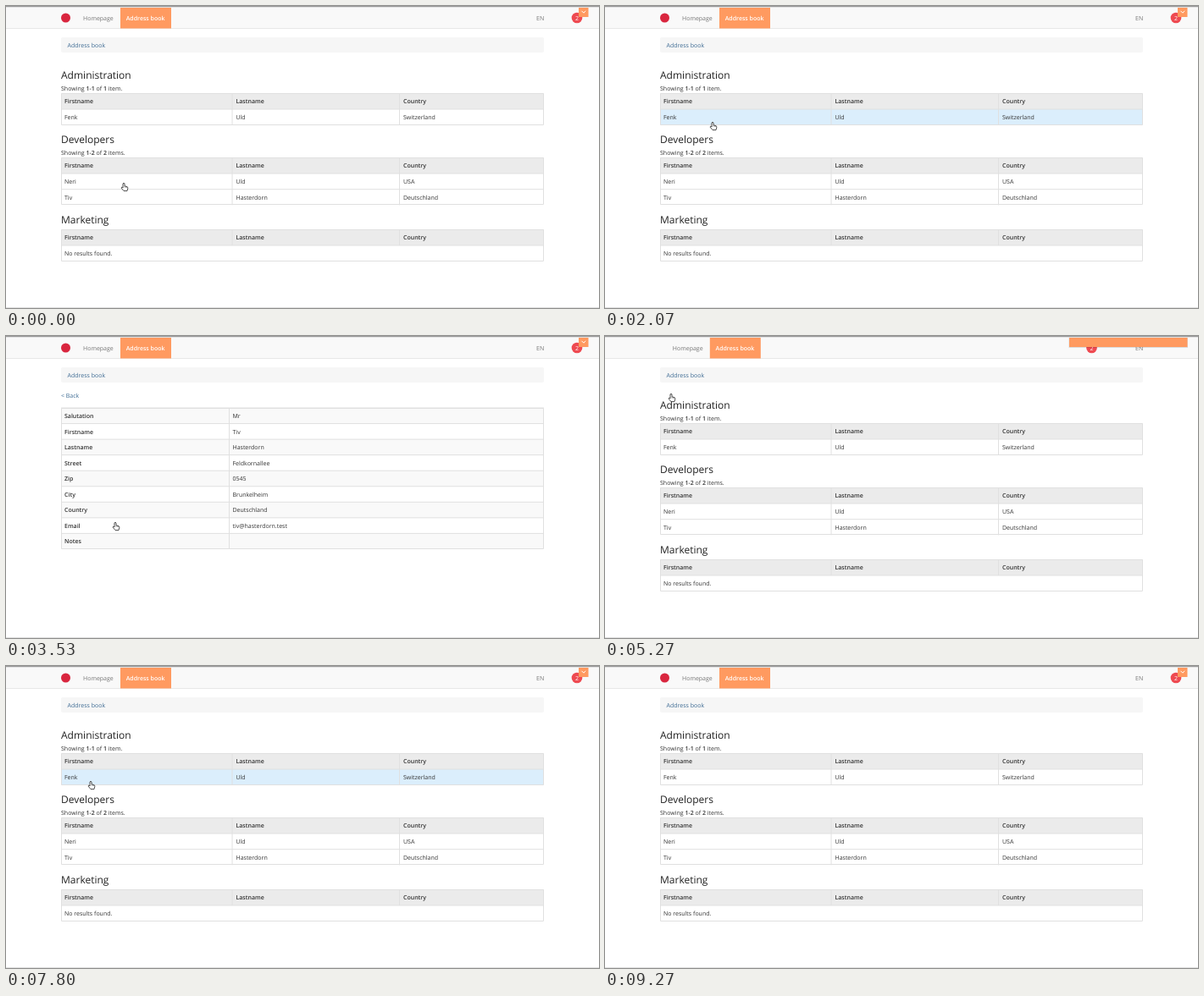
Write an HTML page that moves like this. It is 700x357 px and loops after 9340 ms.

```html
<!DOCTYPE html>
<html lang="en">
<head>
<meta charset="utf-8">
<title>Address book</title>
<style>
  html, body { margin: 0; width: 100%; height: 100%; overflow: hidden; background: #fff; }
  svg { display: block; width: 700px; height: 357px; }
  text { font: 7px "Open Sans", "Noto Sans", sans-serif; fill: #333; white-space: pre; text-rendering: geometricPrecision; }
  .bold { font-weight: 600; }
  .title { font-size: 12px; fill: #222; }
  .link { fill: #3f6c94; }
  .menu { fill: #777; }
  .white { fill: #fff; }
  .line { fill: none; stroke: #e0e0e0; }
  .hover { fill: #dbeefc; }
  .orange { fill: #ff9a60; }
</style>
</head>
<body>
<svg id="stage" viewBox="0 0 700 357"></svg>
<script>
const LOOP = 9340;
const LEFT = 65, RIGHT = 635, WIDTH = RIGHT - LEFT;
const COLS = [69, 271.5, 469];

const people = {
  fenk: ['Mr', 'Fenk', 'Uld', 'Talbogenweg', '0312', 'Ostervalden', 'Switzerland', 'fenk@uldkorn.test', ''],
  neri: ['Mrs', 'Neri', 'Uld', 'Corvel Lane', '0781', 'Pellbrook', 'USA', 'neri@uldkorn.test', ''],
  tiv: ['Mr', 'Tiv', 'Hasterdorn', 'Feldkornallee', '0545', 'Brunkelheim', 'Deutschland', 'tiv@hasterdorn.test', '']
};
const fields = ['Salutation', 'Firstname', 'Lastname', 'Street', 'Zip', 'City', 'Country', 'Email', 'Notes'];

const text = (x, y, str, cls = '') => `<text x="${x}" y="${y}" class="${cls}">${str}</text>`;
const rect = (x, y, w, h, attrs) => `<rect x="${x}" y="${y}" width="${w}" height="${h}" ${attrs}/>`;
const line = d => `<path class="line" d="${d}"/>`;
const cells = (y, row, cls) => row.map((str, i) => text(COLS[i], y, str, cls)).join('');
const group = (id, body) => `<g id="${id}">${body}</g>`;

function table(top, keys) {
  const bottom = top + 19 + 18.7 * (keys.length || 1);
  const colEnd = keys.length ? bottom : top + 19;
  let out = rect(LEFT, top, WIDTH, 19, 'fill="#ebebeb"') +
    cells(top + 12, ['Firstname', 'Lastname', 'Country'], 'bold');
  let lines = `M65.5 ${top + .5}H634.5V${Math.round(bottom) - .5}H65.5Z M65 ${top + 19}H635` +
    `M267 ${top}V${colEnd}M464.5 ${top}V${colEnd}`;
  keys.forEach((key, i) => {
    const y = top + 19 + 18.7 * i, p = people[key];
    out += rect(LEFT, y, WIDTH, 18.7, `class="hover" id="row-${key}"`) +
      cells(y + 12, [p[1], p[2], p[6]]);
    if (i) lines += `M65 ${y}H635`;
  });
  if (!keys.length) out += text(69, top + 30.7, 'No results found.');
  return out + line(lines);
}

function section(y, title, keys) {
  const n = keys.length;
  const summary = n ? text(LEFT, y + 14.4,
    `Showing <tspan class="bold">1-${n}</tspan> of <tspan class="bold">${n}</tspan> item${n > 1 ? 's' : ''}.`) : '';
  return text(LEFT, y, title, 'title') + summary + table(y + (n ? 17 : 7.5), keys);
}

function detail(key) {
  const top = 85, h = 18.55;
  let out = text(LEFT, 72.5, '&lt; Back', 'link'), lines = '';
  fields.forEach((name, i) => {
    const y = top + h * i;
    if (i % 2 === 0) out += rect(LEFT, y, WIDTH, h, 'fill="#f9f9f9"');
    out += text(69, y + 12, name, 'bold') + text(267.5, y + 12, people[key][i]);
    lines += `M65 ${y}H635`;
  });
  return group('detail-' + key, out + line(`M65.5 85.5H634.5V251.5H65.5Z M263.5 85V252${lines}`));
}

const menu = x => text(x, 16.5, 'Homepage', 'menu') +
  rect(x + 44, 1.5, 60, 25, 'class="orange"') +
  text(x + 50.7, 16.5, 'Address book', 'white bold') + text(626, 16.5, 'EN', 'menu');
const badge = x => `<circle cx="${x}" cy="14" r="6.3" fill="#ee4a51"/>` + text(x - 2, 16.6, '2', 'white');

document.getElementById('stage').innerHTML =
  rect(0, 0, 700, 26.5, 'fill="#f9f9f9"') +
  rect(0, 26, 700, 1, 'fill="#e7e7e7"') +
  group('nav', '<circle cx="70.5" cy="14" r="5.5" fill="#d9263f"/>' + menu(91) + badge(674) +
    rect(676, 1, 11.5, 12, 'class="orange"') +
    '<path d="M679.5 5.8l2.4 2.4 2.4-2.4" fill="none" stroke="#fff"/>') +
  group('loading', menu(79.8) + badge(574.5) +
    rect(547.5, 2, 140.5, 12, 'fill="#000" opacity=".12"') +
    rect(548, 1, 139.5, 12, 'class="orange"')) +
  rect(0, 0, 700, 1, 'fill="#999"') + rect(0, 1, 700, 1, 'fill="#e2e2e2"') +
  rect(LEFT, 37, WIDTH, 18, 'rx="2" fill="#f6f6f6"') +
  text(72.5, 48.5, 'Address book', 'link') +
  group('list', section(86, 'Administration', ['fenk']) +
    section(162, 'Developers', ['neri', 'tiv']) + section(256.5, 'Marketing', [])) +
  Object.keys(people).map(detail).join('') +
  rect(0, 356, 700, 1, 'fill="#e2e2e2"') +
  group('hand', '<path d="M-1 1Q0-.7 1 1V3.8L4 4.6Q5 5 4.8 6.5L4 9.6H0L-2.8 6.2Q-2.9 4.8-1.7 5.3L-1 6Z" ' +
    'fill="#fff" stroke="#222" stroke-width=".8" stroke-linejoin="round"/>' +
    '<path d="M1 4V5.6M2.4 4.4V5.8M3.7 4.8V6" stroke="#444" stroke-width=".5"/>');

// Visible spans in ms
const loading = [[3200, 3270], [5200, 5330], [7200, 7270], [7530, 7600], [9000, 9130]];
const details = { tiv: [3200, 5200], neri: [7200, 7530], fenk: [8270, 9000] };
const hovers = {
  fenk: [[1700, 2470], [5860, 5960], [7720, 8270]],
  neri: [[270, 600], [1130, 1400], [2700, 2840], [6240, 7200], [7610, 7650]],
  tiv: [[600, 1130], [2840, 3200]]
};

// Pointer path: time, x, y
const path = [
  [0, 139, 209], [270, 139, 210], [600, 137, 217], [850, 135, 222], [1130, 133, 217],
  [1400, 130, 198], [1700, 127, 141], [1900, 127, 137], [2350, 127, 137], [2470, 127, 142],
  [2700, 128, 198], [2840, 129, 217], [3000, 129, 220], [3600, 129, 220], [4000, 123, 212],
  [4500, 72, 76], [4700, 66, 70], [4950, 78, 68], [5450, 78, 68], [5860, 86, 122],
  [5960, 89, 141], [6240, 97, 199], [6450, 100, 213], [7600, 100, 213], [7750, 100, 136],
  [8450, 100, 136], [8900, 58, -14], [LOOP, 58, -14]
];

const $ = id => document.getElementById(id);
const within = (t, spans) => spans.some(([from, to]) => t >= from && t < to);
const show = (id, on) => $(id).style.display = on ? '' : 'none';

function draw(t) {
  const busy = within(t, loading);
  show('loading', busy);
  show('nav', !busy);
  let open = false;
  for (const key in people) {
    const on = within(t, [details[key]]);
    open = open || on;
    show('detail-' + key, on);
    show('row-' + key, within(t, hovers[key]));
  }
  show('list', !open);

  const i = path.findIndex(p => p[0] > t);
  const [t0, x0, y0] = path[i - 1], [t1, x1, y1] = path[i];
  const k = (t - t0) / (t1 - t0);
  $('hand').setAttribute('transform', `translate(${x0 + (x1 - x0) * k} ${y0 + (y1 - y0) * k})`);
}

let start;
function tick(now) {
  start ??= now;
  draw((now - start) % LOOP);
  requestAnimationFrame(tick);
}
draw(0);
requestAnimationFrame(tick);
</script>
</body>
</html>
```
